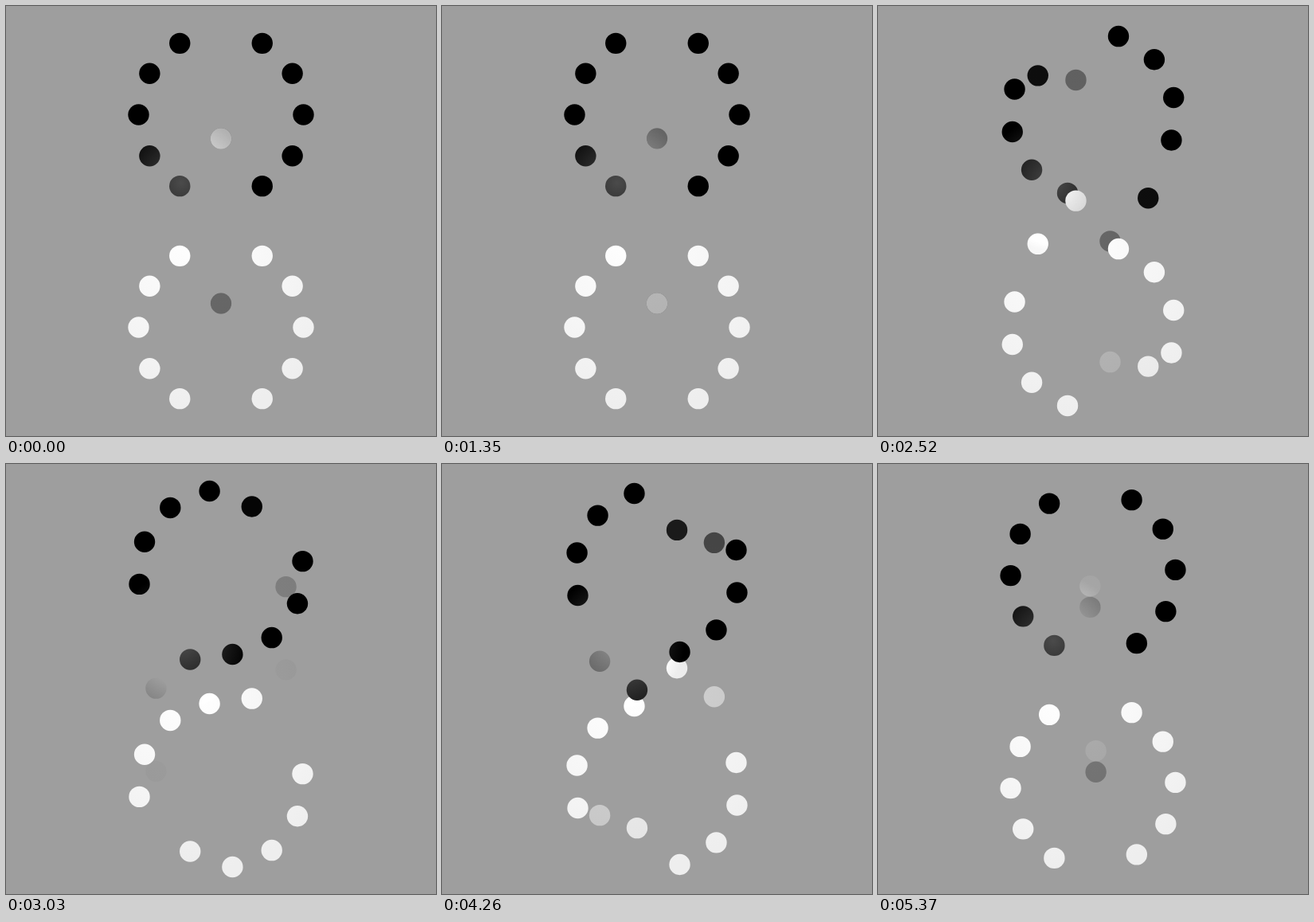
Animation, 540 px wide and 540 px high, one loop 5400 ms. Source, as an HTML page with a canvas:

```html
<!DOCTYPE html>
<html lang="en">
<head>
<meta charset="utf-8">
<title>Dot exchange</title>
<style>
  html, body { margin: 0; height: 100%; overflow: hidden; background: #9e9e9e; }
  canvas { display: block; }
</style>
</head>
<body>
<canvas id="stage" width="540" height="540"></canvas>
<script>
const ctx = document.getElementById('stage').getContext('2d');
const LOOP = 5400, STEP = 30, HALF = LOOP / 2, SWAP = 900, STAGGER = 450;
const CX = 270, TOP_Y = 136.5, DROP = 267, RING = 103.5, DOT = 13.2, COUNT = 12;

const gray = v => {
  const n = Math.max(0, Math.min(255, v));
  return `rgb(${n},${n},${n})`;
};

function radial(x, y, r, inner, outer) {
  const g = ctx.createRadialGradient(x, y, 0, x, y, r);
  g.addColorStop(0, gray(inner));
  g.addColorStop(1, gray(outer));
  return g;
}

const glow = radial(220, 222, 85, 75, 0);

function drawDot(x, y, light) {
  ctx.beginPath();
  ctx.arc(x, y, DOT, 0, 2 * Math.PI);
  ctx.fillStyle = radial(235, 290, 220, 255 * light, 238 * light);
  ctx.fill();
  // soft light near the foot of the upper ring
  if (Math.hypot(x - 220, y - 222) < 85 + DOT) {
    ctx.globalCompositeOperation = 'lighter';
    ctx.fillStyle = glow;
    ctx.fill();
    ctx.globalCompositeOperation = 'source-over';
  }
}

// Each dot drops to the lower ring, stays half a turn, then climbs back.
function ringDot(k, t, offset) {
  const phase = (t - STAGGER * (k - 1) + offset + 2 * LOOP) % LOOP;
  const down = phase < HALF;
  const u = Math.min(1, (phase % HALF) / SWAP);
  const p = u * u * (3 - 2 * u);
  const left = 1 - p;
  const light = down ? (1 - left ** 1.6) ** 0.8 : left ** 1.28;
  const angle = (k / COUNT + t / LOOP) * 2 * Math.PI - Math.PI / 2;
  drawDot(
    CX + RING * Math.cos(angle),
    TOP_Y + RING * Math.sin(angle) + DROP * (down ? p : left),
    light
  );
}

function draw(now) {
  const t = Math.floor((now % LOOP) / STEP) * STEP;
  ctx.fillStyle = '#9e9e9e';
  ctx.fillRect(0, 0, 540, 540);
  for (const offset of [HALF, 0]) {
    for (let k = 0; k < COUNT; k++) ringDot(k, t, offset);
  }
}

let start;
function tick(now) {
  start ??= now;
  draw(now - start);
  requestAnimationFrame(tick);
}
requestAnimationFrame(tick);
</script>
</body>
</html>
```
